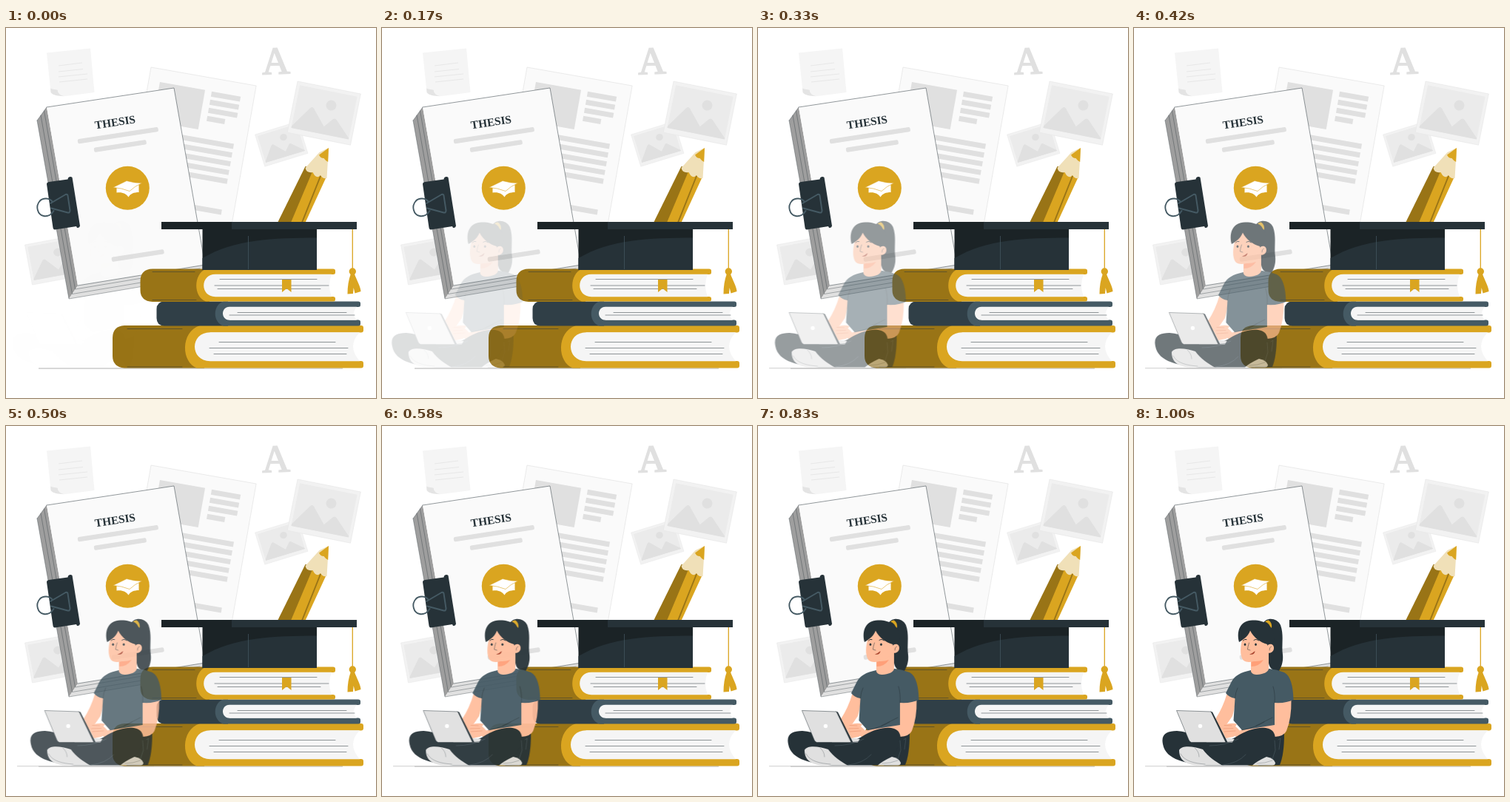
Recreate the animation shown at these times as an HTML page. Size 500 px wide and 500 px high, loop 1.04 s.

```html
<!DOCTYPE html>
<html lang="en">
<head>
<meta charset="utf-8">
<title>Thesis</title>
<style>
  html, body { margin: 0; width: 100%; height: 100%; overflow: hidden; background: #fff; }
  svg { display: block; width: 100vw; height: 100vh; }
  .serif { font-family: "Liberation Serif", "Times New Roman", serif; }
  .gold { fill: #daa520; }
  .olive { fill: #997416; }
  .navy { fill: #263238; }
  .slate { fill: #455a64; }
  .skin { fill: #ffbe9d; }
  .page { fill: #f5f5f5; }
  .grey { fill: #e0e0e0; }
  .thin { fill: none; stroke: #263238; stroke-width: .5; stroke-linecap: round; stroke-linejoin: round; }
  .thin.brow { stroke-width: 1; }
  .thin.crease { stroke: #52636b; }
  .thin.knuckle { stroke: #e58a66; }
  .wire { fill: none; stroke: #455a64; stroke-width: 1.9; stroke-linejoin: round; stroke-linecap: round; }
</style>
</head>
<body>
<svg viewBox="0 0 500 500">
  <defs>
    <!-- picture card, drawn from its top left corner -->
    <g id="card">
      <rect width="87" height="70.5" fill="#f2f2f2" stroke="#e6e6e6" stroke-width=".6"/>
      <rect x="4" y="4.5" width="79" height="59" fill="#ebebeb"/>
      <circle cx="51" cy="23" r="7" class="grey"/>
      <path class="grey" d="M4 63.500V61L24 32Q26.500 29 29 32L47 53L57 41Q59.500 38.500 62 41L83 62V63.500Z"/>
    </g>
  </defs>

  <!-- note -->
  <path class="page" d="M55 33.500L114 27.500L119.500 87L77 92.500L60 82Z"/>
  <path fill="#e4e4e4" d="M60 81.500C65 84 71 82 70 86C71 89 74 91 77.500 92C71 92 63 91 60.500 87Z"/>
  <path fill="none" stroke="#e6e6e6" stroke-width=".9" d="M71 51L103 47M71 59L104 55.500M71 66L110 62M72 73L110 69"/>

  <!-- printed sheet -->
  <g transform="translate(196 53) rotate(10)">
    <rect width="144.300" height="230" fill="#fafafa" stroke="#e0e0e0" stroke-width=".6"/>
    <g class="grey" id="print"><rect x="15.300" y="17.700" width="62" height="54"/></g>
  </g>

  <text class="serif grey" x="365.300" y="61.800" font-size="52" text-anchor="middle" stroke="#e0e0e0" stroke-width="1.800" transform="rotate(-2 365.300 61.800)">A</text>

  <use href="#card" transform="translate(336.500 144) rotate(-17) scale(.7 .64)"/>
  <use href="#card" transform="translate(394 72) rotate(11.300)"/>
  <use href="#card" transform="translate(25.500 293) rotate(-10.500) scale(.82 .78)"/>

  <!-- thesis -->
  <path fill="#9e9e9e" d="M55 107L42 125L85 366L97 348Z"/>
  <path fill="#e0e0e0" d="M97 348L269 320L257 337L85 366Z"/>
  <path class="thin" opacity=".7" d="M51.500 112L93.500 353L262 325M47 118L89.500 359.500L260 331M42 125L85 366L257 337M55 107L42 125"/>
  <path fill="#fafafa" d="M55 107L227 81L269 320L97 348Z"/>
  <path class="thin" d="M55 107L227 81L269 320L97 348"/>
  <text class="serif navy" x="120.800" y="136.500" font-size="15.300" font-weight="bold" transform="rotate(-8.700 120.800 136.500)">THESIS</text>
  <g class="grey" id="cover"></g>
  <circle class="gold" cx="164.300" cy="216.300" r="29.500"/>
  <path fill="#fff" d="M149.500 216V222.500C157 221.500 162 223.500 165.500 228.500C168 224 173 222 179.500 222V211Z"/>
  <path d="M144.500 215.500L163 206.500Q173 209.500 184 209.500Q174 213.500 167 220.500Q156 216 144.500 215.500Z" fill="#fff" stroke="#daa520" stroke-width=".6"/>

  <!-- binder clip -->
  <path class="navy" d="M55 211Q55 208.500 58 208L83.500 204.500L84 202.500Q87 200 89.500 202L100 267.500Q99 270.500 96 270L95 268L66 272.500Q64 272.500 63.500 270Z"/>
  <path class="wire" d="M63 235C59 229.500 50 229 45.500 234C39.500 241 42.500 252.500 51 254C57 255 62 251.500 64.500 247M60 237L80.500 225Q83 224 83.500 226.500L86.500 246.500Q86.500 250 83.500 249.500L61 243.500"/>

  <!-- pencil -->
  <path class="olive" d="M366.500 264L404.500 187L425 190L387 264Z"/>
  <path class="gold" d="M384.500 264L414 194L433 201L404 264Z"/>
  <path class="olive" d="M398.500 264L424.500 199L426 200L400.500 264Z"/>
  <path fill="#f0e0b8" d="M404.500 189L423.500 168L436 162L433.500 203Q428.500 204.500 425 199Q419.500 205 414.500 195Q406 196.500 404.500 189Z"/>
  <path class="gold" d="M423 171.500L436 162L435.200 181Q431 178.500 429.500 176Q425 176 423 171.500Z"/>

  <path d="M44 460H455" stroke="#a8a8a8" stroke-width=".9"/>
  <path id="groundEnd" d="M15 459.700H200" stroke="#c2c2c2" stroke-width=".8"/>

  <!-- bottom book -->
  <path class="olive" d="M268 402H160Q144 403 144 419V443Q144 458 160 459.500H268Z"/>
  <path class="gold" d="M262 402H480Q483 402 483 405V408.500Q483 411.500 480 411.500H276V450H480Q483 450 483 453V456.500Q483 459.500 480 459.500H258C237 452 235 411 262 402Z"/>
  <path class="page" d="M276 411.300H478Q460 430 478 450.200H276C248 450.200 248 411.300 276 411.300Z"/>
  <path class="thin" d="M288 424.500H445M275 432.500H462M281 440.500H460M164 406.500H238M164 458H238"/>

  <!-- middle book -->
  <path fill="#303f47" d="M300 369.500H214Q203.500 370 203.500 380V392Q203.500 402 214 402.500H300Z"/>
  <path class="slate" d="M294 369.500H476Q479 369.500 479 372V374.500Q479 377 476 377H302V394.500H476Q479 394.500 479 397V400Q479 402.500 476 402.500H294C279 398 279 374 294 369.500Z"/>
  <path class="page" d="M302 376.800H474Q466 386 474 394.700H302C290 394.700 290 376.800 302 376.800Z"/>
  <path class="thin" d="M313 384.500H460M302 388H471"/>

  <!-- top book -->
  <path class="olive" d="M275 325.500H198Q181.500 326 181.500 342V354Q181.500 369 198 370H275Z"/>
  <path class="gold" d="M270 325.500H442Q445 325.500 445 328V330.500Q445 333 442 333H283V363H442Q445 363 445 365.500V367Q445 369.500 442 369.500H270C253 363 253 333 270 325.500Z"/>
  <path class="page" d="M283 332.800H440Q434 348 440 363.200H283C262 363.200 262 332.800 283 332.800Z"/>
  <path class="thin" d="M289 339.500H420M282 348H436M286 352.500H425M198 329.500H255M198 367.500H257"/>
  <path class="gold" d="M373 340H385.500V357L379.300 352L373 357Z"/>

  <!-- graduation cap -->
  <path fill="#1b2326" d="M265.500 271H420V327H265.500Z"/>
  <path class="navy" d="M265.500 311C310 285 360 284 420 283.500V327H265.500Z"/>
  <path d="M327.500 281V326" stroke="#455a64" stroke-width=".7"/>
  <path fill="#1b2326" d="M210 262H306V272H210Z"/>
  <path class="navy" d="M305 262H474V272H305Z"/>
  <path d="M468.300 272V328" stroke="#daa520" stroke-width="1.300"/>
  <circle class="gold" cx="468.300" cy="329" r="4.700"/>
  <path class="gold" d="M465.800 332.500H471C473.500 340 479 349 479.500 356L471.500 358.500L469.700 351L469 359L461.500 359.500C461.500 349 463 340 465.800 332.500Z"/>

  <!-- student -->
  <g id="student" opacity="0">
    <path class="navy" d="M174 267C179 258 193 259 198 269C203 283 199 296 201 309C202 319 199 326 196 331C186 331 180 326 182 310Z"/>
    <path class="navy" d="M182 412L203 415Q203 444 197 458L168 459Z"/>

    <!-- arms -->
    <path class="skin" d="M125.500 362L138 366Q136 382 133 392L122 408L110 396Q120 381 125.500 362Z"/>
    <path class="skin" d="M190 370H212.500Q213 395 206 412Q203 419 190 420L140 422L131 414L190 401Z"/>

    <!-- shirt and neck -->
    <path class="slate" d="M158 330C144 333 136 337 131 347L124 361Q129 367 136.500 368L134.500 398L146 411L190 404V374Q205 375 215.500 370C215 352 212 338 203 333Q193 329 183 328Z"/>
    <path class="skin" d="M158 314L182 300V328C182 335 160 340 158 331.500Z"/>
    <path fill="#ff9f78" d="M158.500 317.500Q167 319 175 316Q169 325 158.500 325Z"/>
    <path class="thin" d="M136.500 368Q137 360 140 354M190 374Q191 362 188 352M146 411Q165 407 176 400M165 405L187 394"/>

    <!-- head -->
    <path class="skin" d="M148 281C146 289 142.500 301 145 311C147 319.500 154 320 162 318C170 316 178 311 182 306L181 285L160 274Z"/>
    <path class="navy" d="M142 292C138 276 144 263 160 262.500C176 262 189 270 189.500 284C190 292 187 299 182 304L180 295C170 292 162 286 157 276.500C155 283 149 288 142 292Z"/>
    <path class="skin" d="M179.500 298C182 293 189 294 189 300C189 306 183 308 179.500 306Z"/>
    <path class="gold" d="M177 264.500Q180 262 182 262.500Q187 266 186 273L184 271Q182 266 177 264.500Z"/>
    <ellipse class="navy" cx="150" cy="295.300" rx="1.300" ry="1.700"/>
    <ellipse class="navy" cx="164.500" cy="295.300" rx="1.300" ry="1.700"/>
    <path class="thin brow" d="M147.500 290Q149 287.500 152 288.500M162 289.500Q165 287 168.500 290"/>
    <path class="thin" d="M155.500 293Q153.500 299 153.500 302L157 303M185.500 298Q182.500 299 183 303"/>
    <path fill="#a8442d" d="M156 308.500Q160.500 307 163.500 304Q163 310 156 308.500Z"/>

    <!-- legs and shoes -->
    <path class="navy" d="M39 430C36 416 45 412 58 412C75 413 95 424 112 427Q129 427 143 417C160 407 181 404 188 413C197 426 184 449 160 458.500H98C72 456 43 452 39 430Z"/>
    <path class="thin crease" d="M102 432Q123 432 141 423M190 425L191 438L187 450M195 424L198 422L196 437M120 458Q140 456 151 444"/>
    <path class="grey" d="M61 438C65 431 80 433 93 437C100 447 110 453 119 458.500H84C67 457 61 449 61 438Z"/>
    <path class="thin" opacity=".55" d="M63 443C68 453 82 456 96 457M82 435Q88 440 88 447"/>
    <path class="grey" d="M160 458.500Q166 453 179 447Q189 449 191 455Q191 458.500 187 458.500Z"/>
    <path class="thin" opacity=".5" d="M166 456Q177 456 187 452"/>

    <!-- laptop and hands -->
    <path class="grey" d="M98 426L123 421L136 423L133 427.500H98Z"/>
    <path class="skin" d="M111 398Q116 401 122 404Q132 400 139 403L137 406Q144 411 143 415L134 420L124 422L118 410L109 404Z"/>
    <path class="thin knuckle" d="M122 404.500L132 405M121 409L134 408.500M122 413L137 412"/>
    <path class="navy" d="M103 385.500L106 386.500L126.500 427.500H122Z"/>
    <path d="M57.500 384.500L104 386L124 427.500H77.500Q75 427 74 424Z" fill="#e0e0e0" stroke="#263238" stroke-width=".5"/>
    <path class="thin" d="M124 427.500L134 426.500L136 423"/>
    <circle cx="89.500" cy="405.500" r="2.700" fill="#fff"/>
  </g>
</svg>
<script>
  const $ = id => document.getElementById(id);

  function bar(parent, x, y, w, h = 7, turn = 0, round = 0) {
    const r = document.createElementNS("http://www.w3.org/2000/svg", "rect");
    const attrs = { x, y, width: w, height: h, rx: round, transform: `rotate(${turn} ${x} ${y})` };
    for (const k in attrs) r.setAttribute(k, attrs[k]);
    parent.append(r);
  }

  for (let i = 0; i < 4; i++) bar($("print"), 86.5, 18 + i * 11.2, i < 3 ? 39.7 : 24.5);
  for (let i = 0; i < 5; i++) bar($("print"), 15.3, 82.5 + i * 12, 113);
  bar($("print"), 15.3, 173, 112.5);

  bar($("cover"), 96.5, 150.3, 110, 6.3, -8.7, 2);
  bar($("cover"), 118.5, 161.8, 71.5, 6.3, -8.7, 2);
  bar($("cover"), 142.3, 309.8, 71.5, 6.3, -8.7, 2);

  const FPS = 24, FRAMES = 25, LOOP = 1040;
  const slide = $("student").animate([
    { opacity: 0, transform: "translateX(-30px)" },
    { opacity: 1, transform: "translateX(0px)" }
  ], { duration: 1000, fill: "both", easing: "cubic-bezier(.36, -.01, .5, 1.38)" });
  slide.pause();

  // Frame starts are rounded to hundredths of a second.
  const startOf = n => Math.round(n * 100 / FPS) * 10;

  function draw(now) {
    const t = now % LOOP;
    let n = FRAMES - 1;
    while (n > 0 && startOf(n) > t) n--;
    // Each frame shows the pose reached at its end.
    slide.currentTime = (n + 1) * 1000 / FPS;
    $("groundEnd").style.visibility = n > 5 ? "visible" : "hidden";
  }

  const begin = performance.now();
  function tick() {
    draw(performance.now() - begin);
    requestAnimationFrame(tick);
  }
  tick();
</script>
</body>
</html>
```
